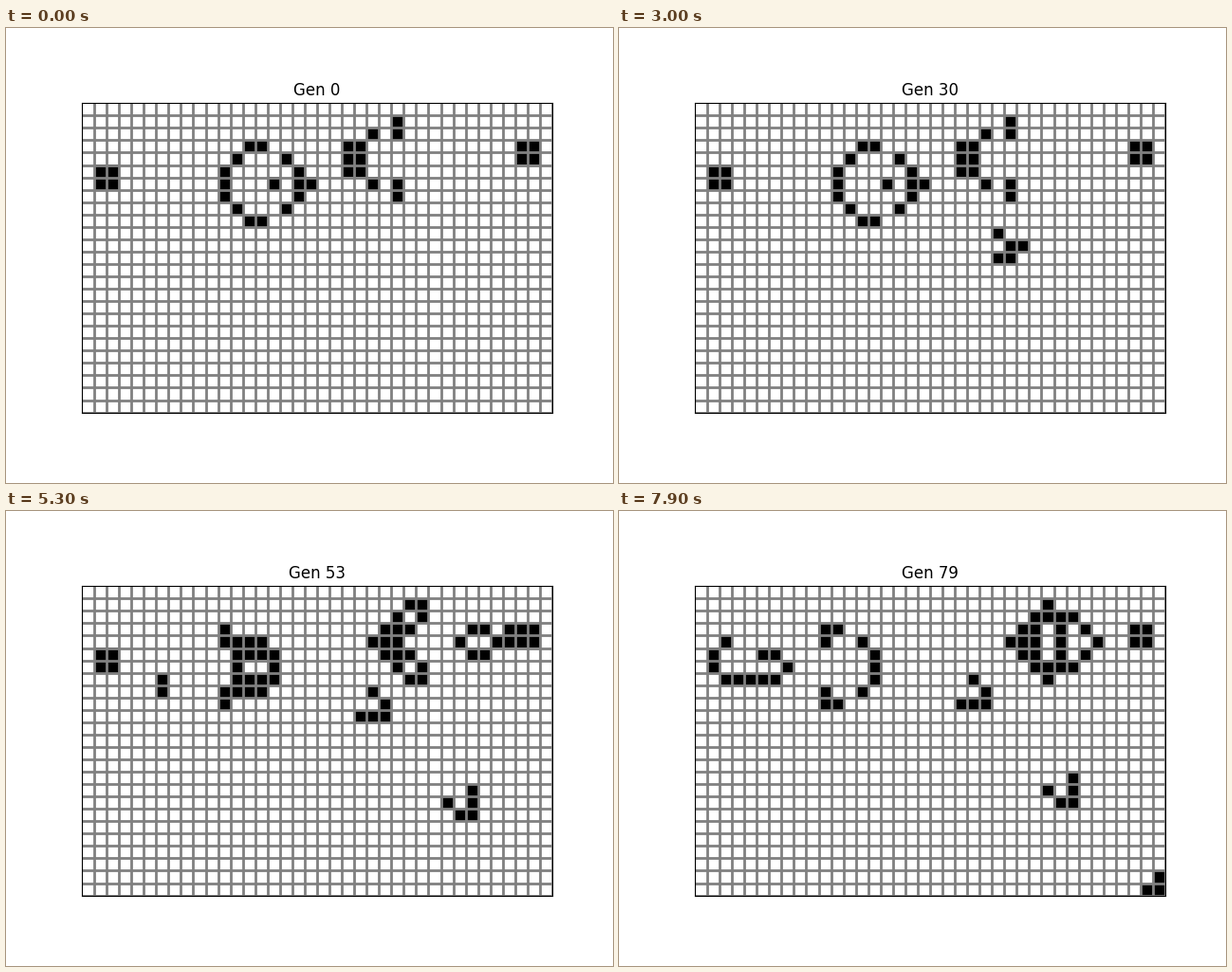
A matplotlib script for the animation above (8000 ms loop, 640 by 480 pixels).

```python
import numpy as np
import matplotlib.pyplot as plt
from matplotlib.animation import FuncAnimation

ROWS, COLS = 25, 38
FRAMES, INTERVAL = 80, 100


def add_block(grid, row, col, height=2):
    grid[row:row + height, col:col + 2] = 1


def add_ring(grid, row, col, radius=3):
    """Round body, open at its upper and lower right, with a pointed nose."""
    y, x = np.indices(grid.shape)
    grid[np.abs(np.hypot(y - row, x - col) - radius) < 0.2] = 1
    grid[[row - radius, row + radius], col + 1] = 0
    grid[row, [col + 1, col + radius + 1]] = 1


def add_wings(grid, row, col):
    """Three-cell bar with mirrored wings to its right."""
    add_block(grid, row - 1, col, height=3)
    for side in (-1, 1):
        grid[row + 2 * side, [col + 2, col + 4]] = 1
        grid[row + 3 * side, col + 4] = 1


def glider_gun():
    grid = np.zeros((ROWS, COLS), dtype=int)
    add_block(grid, 5, 1)
    add_ring(grid, 6, 14)
    add_wings(grid, 4, 21)
    add_block(grid, 3, 35)
    return grid


def step(grid):
    """Next generation; everything beyond the border is dead."""
    p = np.pad(grid, 1)
    near = sum(p[r:r + ROWS, c:c + COLS]
               for r in range(3) for c in range(3)) - grid
    return ((near == 3) | ((grid == 1) & (near == 2))).astype(int)


generations = [glider_gun()]
while len(generations) < FRAMES:
    generations.append(step(generations[-1]))

fig, ax = plt.subplots(figsize=(6.4, 4.8), dpi=100)
image = ax.imshow(generations[0], cmap="binary", vmin=0, vmax=1,
                  interpolation="nearest")
title = ax.set_title("Gen 0")

# Grid lines on the right and lower side of every cell
ax.set_xticks([])
ax.set_yticks([])
ax.set_xticks(np.arange(COLS) + 0.5, minor=True)
ax.set_yticks(np.arange(ROWS) + 0.5, minor=True)
ax.grid(which="minor", color="gray", linewidth=2)
ax.tick_params(which="minor", length=0)
ax.set_xlim(-0.5, COLS - 0.5)
ax.set_ylim(ROWS - 0.5, -0.5)


def update(n):
    image.set_data(generations[n])
    title.set_text(f"Gen {n}")
    return image, title


anim = FuncAnimation(fig, update, frames=FRAMES, interval=INTERVAL,
                     repeat=True, repeat_delay=0, blit=False)
plt.show()
```
